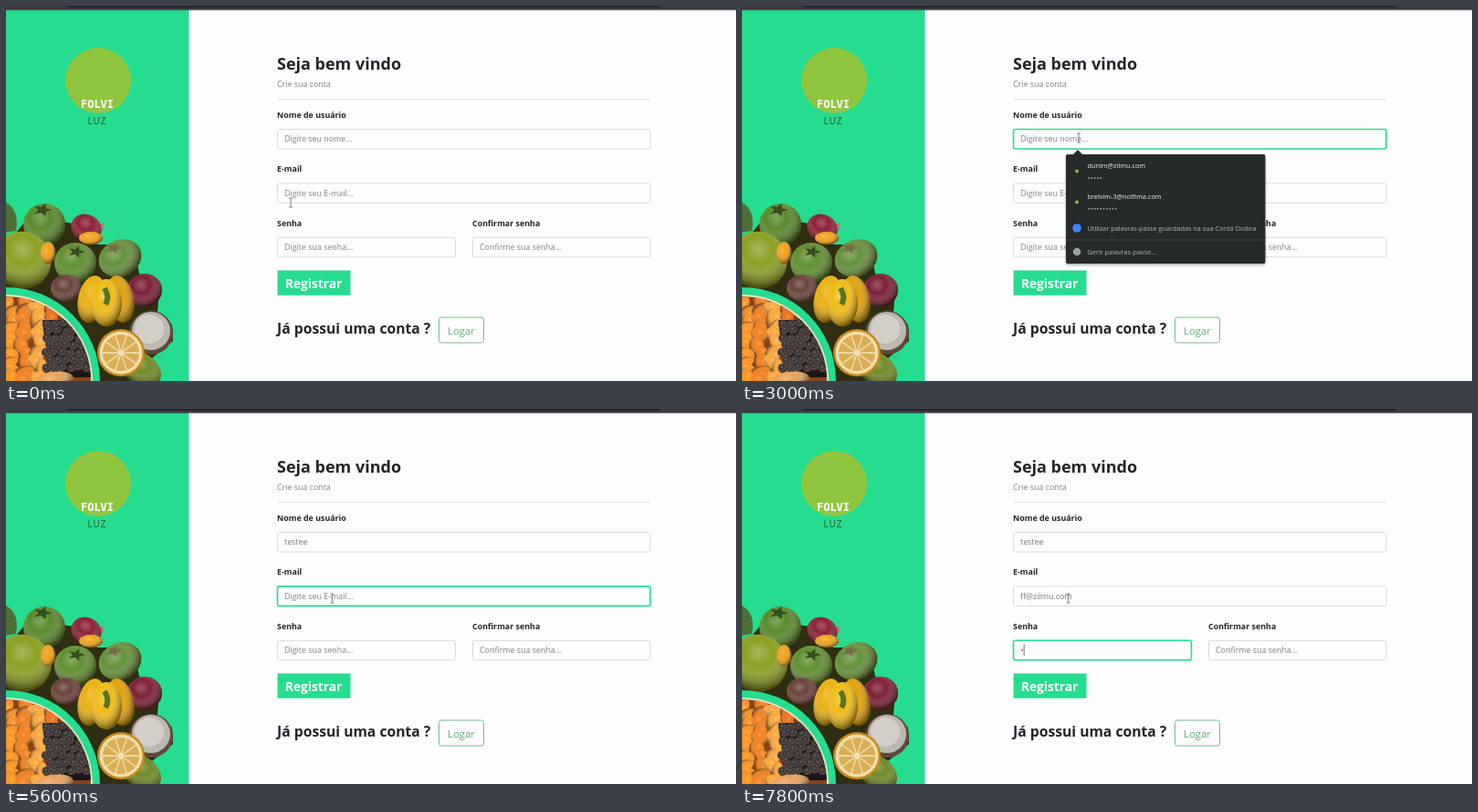
An HTML page that plays this animation: 800x412 px, repeating every 8 s.

```html
<!DOCTYPE html>
<html lang="pt">
<head>
<meta charset="utf-8">
<title>Registro</title>
<style>
  html, body { margin: 0; width: 100%; height: 100%; overflow: hidden; background: #fefdfe; }
  svg { display: block; width: 100%; height: 100%; }
  text { font-family: "Open Sans", "Noto Sans", sans-serif; font-size: 8.9px; fill: #212529; white-space: pre; }
  .bold { font-weight: 700; }
  .hint { fill: #7d8287; }
  .typed { fill: #74787c; }
  .popup { font-size: 7.3px; fill: #f1f3f4; }
  .dim { fill: #b4b7bb; }
</style>
</head>
<body>
<svg viewBox="0 0 800 412">
  <defs>
    <radialGradient id="shade" cx=".4" cy=".35" r=".65">
      <stop offset="0" stop-color="#fff" stop-opacity=".25"/>
      <stop offset=".4" stop-color="#fff" stop-opacity="0"/>
      <stop offset="1" stop-color="#160d00" stop-opacity=".55"/>
    </radialGradient>
    <filter id="shadow" x="-10%" y="-10%" width="120%" height="130%">
      <feDropShadow dx="0" dy="1.5" stdDeviation="1.8" flood-opacity=".35"/>
    </filter>
    <clipPath id="bowl"><circle cx="0" cy="412" r="93"/></clipPath>
  </defs>
  <g id="page"></g>
  <g id="live"></g>
</svg>
<script>
const GREEN = '#26dc8f', LOOP = 8000, STEP = 200;
const page = document.getElementById('page'), live = document.getElementById('live');

const text = (x, y, value, cls = '', style = '') =>
  `<text x="${x}" y="${y}" class="${cls}" style="${style}">${value}</text>`;
const rect = (x, y, w, h, attrs) => `<rect x="${x}" y="${y}" width="${w}" height="${h}" ${attrs}/>`;
const circle = (x, y, r, fill) => `<circle cx="${x}" cy="${y}" r="${r}" fill="${fill}"/>`;
const path = (d, attrs) => `<path d="${d}" ${attrs}/>`;

function fruit(x, y, rx, ry, fill, turn = 0) {
  const shape = paint => `<ellipse cx="${x}" cy="${y}" rx="${rx}" ry="${ry}" fill="${paint}" transform="rotate(${turn} ${x} ${y})"/>`;
  return shape(fill) + shape('url(#shade)');
}

let seed = 7;
const random = () => (seed = seed * 16807 % 2147483647) / 2147483647;
const repeat = (n, draw) => Array.from({ length: n }, (_, i) => draw(i)).join('');

function calyx(x, y, r, fill) {
  const points = repeat(10, i => {
    const a = i * Math.PI / 5, d = i % 2 ? r * .4 : r;
    return `${x + d * Math.cos(a)},${y + d * .7 * Math.sin(a)} `;
  });
  return `<polygon points="${points}" fill="${fill}"/>`;
}

function orangeHalf(x, y) {
  const slices = repeat(10, i => {
    const a = i * Math.PI / 5;
    return `M${x} ${y}L${x + 20 * Math.cos(a)} ${y + 20 * Math.sin(a)}`;
  });
  return circle(x, y, 26, '#c98a1c') + circle(x, y, 23.5, '#efdfae') + circle(x, y, 20, '#dcae55') +
    path(slices, 'stroke="#f3e3b8" stroke-width="1.3"') + circle(x, y, 3, '#f3e3b8');
}

function bowl() {
  const oranges = ['#fa931f', '#f27f1c', '#ffa53a', '#ea6f17'];
  const apricots = repeat(40, i => fruit(i % 4 * 16 + random() * 8, 322 + Math.floor(i / 4) * 9.5 + random() * 6,
    9 + random() * 4, 6 + random() * 3, oranges[i % 4], random() * 180));
  const berries = repeat(42, i => {
    const row = Math.floor(i / 6), col = i % 6;
    return fruit(43 + col * 9 + row % 2 * 4 + random() * 2, 348 + row * 8 + random() * 2, 5, 4.8, '#37302f');
  });
  return circle(0, 412, 103, GREEN) + circle(0, 412, 95, '#e9dfc0') +
    `<g clip-path="url(#bowl)">${circle(0, 412, 93, '#8a4314')}${apricots}` +
    path('M40 345H70L96 380V408H66Q42 385 40 345Z', 'fill="#1c1616"') + berries +
    fruit(52, 411, 22, 9, '#e8a262', -8) + '</g>';
}

const food =
  path('M0 262L25 232L82 240L100 262L140 262L146 294L168 310L166 336L182 350L183 368L150 395L152 412H0Z', 'fill="#2f2e12"') +
  path('M0 216Q15 224 11 247L0 249Z', 'fill="#4c7137"') +
  path('M88 244L108 238L106 246L94 254Z', 'fill="#b77b66"') +
  fruit(42, 240, 23, 23, '#5a8a2c') + calyx(40, 224, 11, '#364d1c') +
  fruit(88, 244, 17, 15, '#8d2038', 30) +
  fruit(18, 279, 32, 31, '#8a9f24', 35) +
  fruit(93, 255, 13, 7, '#f0a41c') +
  fruit(76, 282, 23, 22, '#608f30') + calyx(77, 270, 10, '#374b1f') +
  fruit(46, 271, 8, 12, '#f0a01c') +
  fruit(125, 277, 24, 20, '#64903a', -25) + calyx(118, 266, 9, '#7a6a43') +
  fruit(66, 310, 17, 15, '#694239') +
  fruit(152, 312, 19, 18, '#7d2038') +
  fruit(94, 322, 15, 26, '#e9b010', 12) + fruit(125, 322, 15, 26, '#e0a30e', -12) +
  fruit(110, 326, 17, 26, '#f0bc18') + path('M108 310Q114 320 109 328', 'fill="none" stroke="#587325" stroke-width="6"') +
  circle(159, 359, 24, '#5d4a3c') + circle(159, 357, 21, '#bdb8b2') + circle(157, 355, 16, '#d2cec8') +
  fruit(148, 399, 24, 17, '#6f8a28', 35) +
  bowl() + orangeHalf(126, 381);

const brand = circle(101, 82, 36, '#90c63f') +
  text(100, 112, 'FOLVI', '', "font:bold 12px 'DejaVu Sans Mono',monospace;fill:#fff;text-anchor:middle") +
  text(100, 130, 'LUZ', '', 'font-size:10px;letter-spacing:1px;fill:#28502c;text-anchor:middle');

const fields = {
  name:    { x: 297, y: 135, w: 409.5, label: 'Nome de usuário', hint: 'Digite seu nome...' },
  email:   { x: 297, y: 194.4, w: 409.5, label: 'E-mail', hint: 'Digite seu E-mail...' },
  pass:    { x: 297, y: 253.8, w: 196, label: 'Senha', hint: 'Digite sua senha...' },
  confirm: { x: 511, y: 253.8, w: 195.5, label: 'Confirmar senha', hint: 'Confirme sua senha...' }
};

page.innerHTML =
  rect(0, 0, 800, 412, 'fill="#fefdfe"') +
  rect(0, 4, 200.5, 408, `fill="${GREEN}"`) + food + brand +
  rect(0, 0, 800, 4.5, 'fill="#3b3a42"') + rect(67, 0, 650, 1.5, 'fill="#202024"') +
  text(297, 70, 'Seja bem vindo', 'bold', 'font-size:18px') +
  text(297, 89, 'Crie sua conta', 'hint') +
  rect(297, 102, 409.5, 1, 'fill="#e2e2e4"') +
  Object.values(fields).map(f => text(f.x, f.y - 12.2, f.label, 'bold')).join('') +
  rect(297.5, 290.5, 80, 27.3, `fill="${GREEN}"`) +
  text(306, 310, 'Registrar', 'bold', 'font-size:13.7px;fill:#fff') +
  text(297, 360, 'Já possui uma conta ?', 'bold', 'font-size:15.7px') +
  rect(474.5, 342, 49, 28, 'rx="2.5" fill="none" stroke="#74bf87"') +
  text(484, 360.5, 'Logar', '', 'font-size:11.4px;fill:#60ab72');

function field({ x, y, w, hint }, value, focused) {
  const border = focused ? `stroke="${GREEN}" stroke-width="1.6"` : 'stroke="#d7dade"';
  return rect(x + .5, y + .5, w - 1, 21.5, `rx="2" fill="#fefdfe" ${border}`) +
    text(x + 8, y + 14.4, value || hint, (value ? 'typed' : 'hint') + (focused ? ' focus' : ''));
}

const panel = (y, w, h) => `<g filter="url(#shadow)">${rect(355, y, w, h, 'rx="2" fill="#28292c"')}` +
  path(`M362.5 ${y + .5}L368 ${y - 5}L373.5 ${y + .5}Z`, 'fill="#28292c"') + '</g>';

const dots = (y, n) => path(`M380 ${y}h${(n - 1) * 3.3 + .1}`,
  'stroke="#a4a7ab" stroke-width="1.8" stroke-linecap="round" stroke-dasharray="0 3.3"');

const accountPopup = panel(163, 218.5, 120) +
  circle(367, 181.5, 2, '#8bb53c') + text(378.5, 178, 'dunim@zilmu.com', 'popup') + dots(189, 5) +
  circle(367, 215.5, 2, '#8bb53c') + text(378.5, 212, 'brelvim-3@nolfima.com', 'popup') + dots(222.7, 10) +
  circle(367, 244, 4.8, '#4285f4') +
  text(378.5, 246.5, 'Utilizar palavras-passe guardadas na sua Conta Dolbra', 'popup dim') +
  rect(355, 256.5, 218.5, 1, 'fill="#404246"') +
  circle(367, 270, 4.3, '#9a9da1') + text(378.5, 273, 'Gerir palavras-passe...', 'popup dim');

const emailPopup = panel(222, 70.5, 26) + text(362, 238, 'ff@zilmu.com', 'popup');

// [time, x, y]
const pointerKeys = [[0, 312, 216], [800, 312, 216], [2000, 326, 194], [2400, 369, 145],
  [4400, 369, 145], [5000, 357.5, 208], [LOOP, 357.5, 208]];

function pointerAt(t) {
  const i = pointerKeys.findIndex(k => k[0] > t);
  const [t0, x0, y0] = pointerKeys[i - 1], [t1, x1, y1] = pointerKeys[i];
  const p = (t - t0) / (t1 - t0), ease = p * p * (3 - 2 * p);
  return [x0 + (x1 - x0) * ease, y0 + (y1 - y0) * ease];
}

const typed = (value, t, start) => value.slice(0, Math.max(0, Math.floor((t - start) / STEP) + 1));

function draw(t) {
  const focus = t < 2400 ? '' : t < 5400 ? 'name' : t < 7400 ? 'email' : 'pass';
  const values = {
    name: typed('testee', t, 3600),
    email: t < 7000 ? typed('ff', t, 5800) : 'ff@zilmu.com',
    pass: typed('•', t, 7800)
  };
  const [px, py] = pointerAt(t);
  live.innerHTML =
    Object.entries(fields).map(([key, f]) => field(f, values[key], key === focus)).join('') +
    (t >= 2600 && t < 3600 ? accountPopup : '') +
    (t >= 5800 && t < 7000 ? emailPopup : '') +
    path(`M${px - 2} ${py - 5}h4M${px} ${py - 5}v10M${px - 2} ${py + 5}h4`, 'fill="none" stroke="#76787b" stroke-width=".9"');

  if (values[focus]) {
    const f = fields[focus], width = live.querySelector('.focus').getComputedTextLength();
    live.insertAdjacentHTML('beforeend', rect(f.x + 8.3 + width, f.y + 5, .9, 12, 'fill="#55585c"'));
  }
}

let shown = -1;
function tick() {
  const t = Math.floor(performance.now() % LOOP / STEP) * STEP;
  if (t !== shown) draw(shown = t);
  requestAnimationFrame(tick);
}
tick();
</script>
</body>
</html>
```
